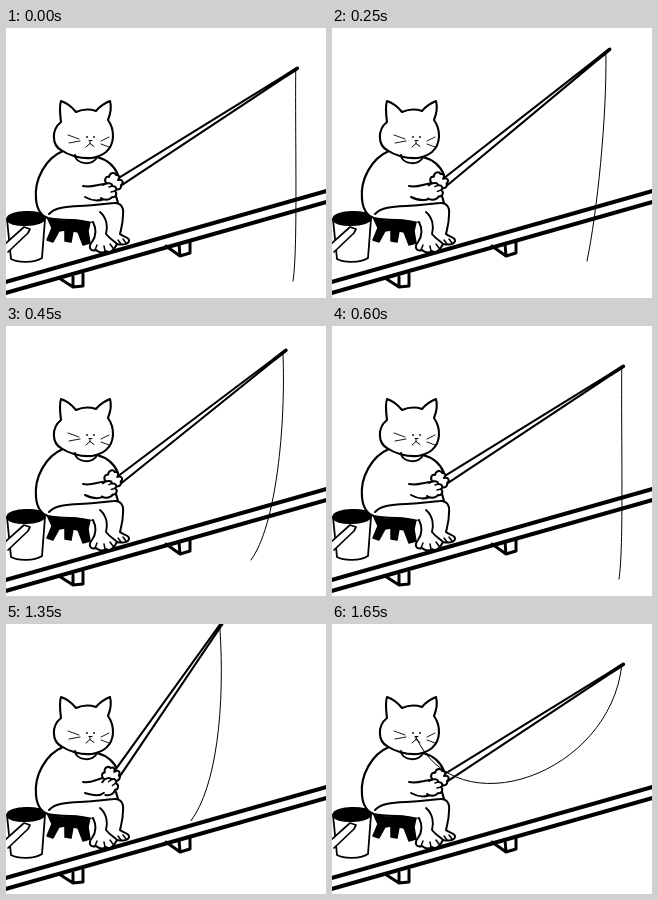
Animation, 320 px wide and 270 px high, one loop 3 s. Source, as an HTML page with a canvas:

```html
<!DOCTYPE html>
<html lang="en">
<head>
<meta charset="utf-8">
<title>Fishing cat</title>
<style>
html, body { margin: 0; width: 100%; height: 100%; overflow: hidden; background: #fff; }
canvas { display: block; width: 320px; height: 270px; }
</style>
</head>
<body>
<canvas id="stage"></canvas>
<script>
const LOOP = 3000, STEP = 50, REST = 32.6, ROD = 213;
const canvas = document.getElementById('stage');
const ctx = canvas.getContext('2d');
const ratio = window.devicePixelRatio || 1;
canvas.width = 320 * ratio;
canvas.height = 270 * ratio;

// time, rod angle, line distance from tip, then two curve handles and the line end
const poses = [
  [0, REST, 2, 289, 110, 292, 222, 287, 253],
  [100, 34.2, 2, 286, 105, 288, 215, 280, 251],
  [250, 38.9, 5, 275, 90, 265, 185, 255, 233],
  [350, 41.4, 8, 270, 90, 262, 188, 243, 228],
  [450, 37.9, 4, 280, 100, 270, 200, 245, 234],
  [550, 34.3, 2, 289, 110, 290, 210, 277, 250],
  [600, REST, 2, 289, 110, 292, 222, 287, 253],
  [1200, REST, 2, 289, 110, 292, 222, 287, 253],
  [1250, 45.4, 17, 252, 90, 251, 190, 245, 226],
  [1400, 60, 33, 203, 80, 190, 150, 155, 182],
  [1500, 61.8, 36, 186, 70, 160, 122, 108, 133],
  [1600, 42, 10, 250, 125, 130, 180, 86, 114],
  [1650, REST, 2, 278, 150, 125, 205, 84, 113],
  [LOOP, REST, 2, 278, 150, 125, 205, 84, 113]
];

function poseAt(t) {
  const i = poses.findIndex(p => p[0] > t);
  const a = poses[i - 1], b = poses[i];
  const k = (t - a[0]) / (b[0] - a[0]);
  return a.map((v, n) => v + (b[n] - v) * k);
}

function draw(d, width, fill) {
  const path = new Path2D(d);
  if (fill) {
    ctx.fillStyle = fill;
    ctx.fill(path);
  }
  if (width) {
    ctx.lineWidth = width;
    ctx.stroke(path);
  }
}

function plank() {
  draw('M-4 255 L324 162 M-4 266 L324 173', 4);
  draw('M53 250 L67 259 L77 258 V246 M67 249 V259', 3);
  draw('M160 218 L174 228 L184 225 V213 M173 216 L174 228', 3);
}

function bucket() {
  draw('M1 191 L5 231 C12 235 28 235 36 230 L39 191', 1.8, '#fff');
  draw('M1 191 C1 182 39 181 39 190 C39 199 1 200 1 191 Z', 1.5, '#000');
  draw('M-1 216 L18 199 L24 201 L22 205 L2 224', 1.7, '#fff');
}

function stool() {
  draw('M41 189 C54 194 70 192 84 194 L82 203 L84 215 L77 217 L72 204 L67 203' +
    ' L65 214 L59 213 L59 202 L53 203 L47 214 L41 212 L46 200 Z', 1.5, '#000');
}

function body() {
  draw('M57 123 C40 130 28 151 30 171 C31 183 36 188 42 190 C52 194 74 192 89 193' +
    ' L112 175 L113 148 C110 140 104 133 92 129 Z', 0, '#fff');
  draw('M57 123 C40 130 28 151 30 171 C31 183 36 188 42 190 C55 193 74 191 87 194', 2.2);
  draw('M91 129 C102 132 109 139 112 147 M110 168 L112 175', 2.2);
  // legs and feet
  draw('M43 186 C51 177 69 179 88 177 L108 175 C115 174 118 180 117 187' +
    ' C117 196 115 201 114 206 C117 209 124 209 123 213 C122 217 115 217 111 216' +
    ' C108 222 104 226 100 223 C95 226 91 223 90 222 C84 224 82 219 86 214' +
    ' C91 207 90 200 87 194', 2, '#fff');
  draw('M94 184 C101 190 102 199 100 206 C104 211 108 213 111 216', 1.9);
  draw('M91 217 L89 222 M98 218 L99 223 M104 216 L107 220 M112 212 L115 216 M117 211 L120 215', 1.5);
}

function head() {
  draw('M55 122 C46 117 45 102 55 94 C54 86 53 79 55 73 C61 75 66 79 70 84' +
    ' C77 81 84 81 90 83 C94 78 99 75 104 73 C106 80 104 87 102 92' +
    ' C109 102 109 116 100 124 C95 128 91 129 86 130 C74 131 62 127 55 122 Z', 2.1, '#fff');
  draw('M69 127 C70 137 88 138 91 129', 2);
  draw('M62 107 L73 111 M63 115 L74 113 M95 113 L103 109 M95 116 L103 119', 0.9);
  draw('M84 113 V115.5 M80 119 L84 115.5 L88 118.5 M83 112.5 H86', 1);
  for (const x of [81, 88]) {
    ctx.beginPath();
    ctx.arc(x, 109, 0.9, 0, 7);
    ctx.fillStyle = '#000';
    ctx.fill();
  }
}

function rod(pivot, rad) {
  ctx.save();
  ctx.translate(pivot.x, pivot.y);
  ctx.rotate(-rad);
  draw(`M2 -3.8 L${ROD} -0.5 V0.5 L2 3.8 Z`, 2.1, '#fff');
  draw(`M${ROD - 15} 0 H${ROD}`, 3.3);
  ctx.restore();
}

function arm(lift) {
  draw(`M77 158 C86 160 92 ${156 - lift} 100 ${156 - lift}`, 2);
  draw(`M79 169 C86 ${173 - lift} 93 173 98 ${171 - lift}`, 2);
}

function hands(turn, lift) {
  ctx.save();
  ctx.translate(104 - lift * 0.4, 158 - lift * 0.7);
  ctx.rotate(-turn);
  ctx.translate(-104, -158);
  draw('M101 156 C97 152 100 148 103 149 C104 144 109 144 110 147' +
    ' C114 147 114 150 112 152 C117 151 118 155 115 157 C116 161 112 162 110 161', 2, '#fff');
  draw('M97 157 C101 154 107 155 106 158 C111 158 111 162 109 163' +
    ' C112 166 109 170 106 169 C103 173 97 172 95 170', 2, '#fff');
  draw('M103 159 L106 158 M105 164 L109 163', 1.4);
  ctx.restore();
}

function frame(now) {
  const t = Math.floor((now % LOOP) / STEP) * STEP;
  const [, angle, slide, ax, ay, bx, by, ex, ey] = poseAt(t);
  const rad = angle * Math.PI / 180;
  const raise = Math.max(0, (angle - 45.4) / 16.4);
  const lift = (angle - REST) / 10;
  const pivot = { x: 112 - 7 * raise, y: 155 - raise };

  ctx.setTransform(ratio, 0, 0, ratio, 0, 0);
  ctx.fillStyle = '#fff';
  ctx.fillRect(0, 0, 320, 270);
  ctx.strokeStyle = '#000';
  ctx.lineCap = ctx.lineJoin = 'round';

  plank();
  stool();
  bucket();
  body();
  head();
  arm(lift);
  rod(pivot, rad);
  hands(rad - REST * Math.PI / 180, lift);

  const reach = ROD - slide;
  const x = pivot.x + reach * Math.cos(rad), y = pivot.y - reach * Math.sin(rad);
  draw(`M${x} ${y} C${ax} ${ay} ${bx} ${by} ${ex} ${ey}`, 1);
}

let start;
function tick(now) {
  if (start === undefined) start = now;
  frame(now - start);
  requestAnimationFrame(tick);
}
frame(0);
requestAnimationFrame(tick);
</script>
</body>
</html>
```
